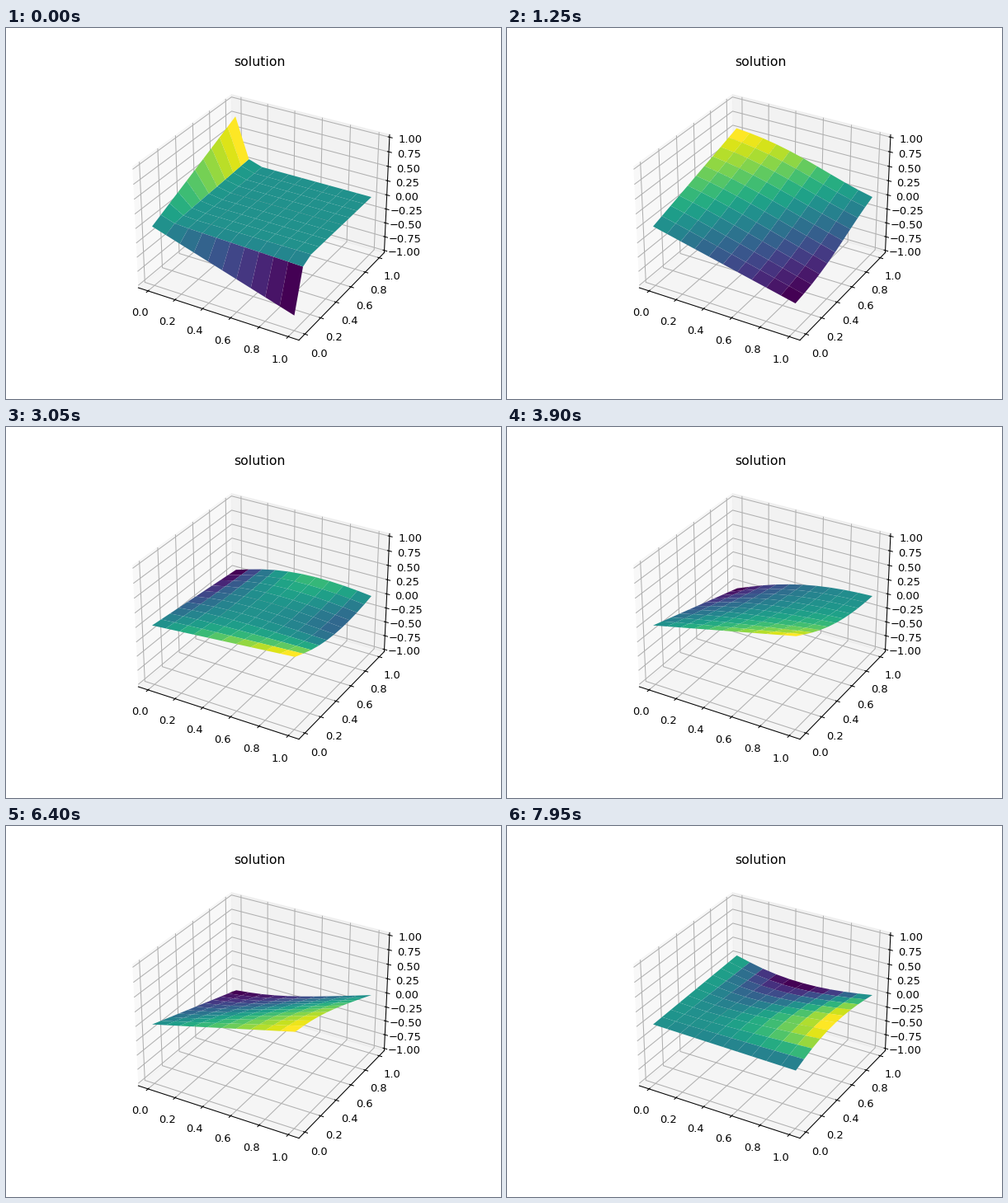
Write a matplotlib script that moves like this. It is 600x450 px and loops after 8 s.

```python
import numpy as np
import matplotlib.pyplot as plt
from matplotlib.animation import FuncAnimation
from mpl_toolkits.mplot3d.art3d import Poly3DCollection

FRAMES, INTERVAL = 160, 50
CELLS = 10          # grid cells per side
DT = 0.01           # time step of the solver
SUBSTEPS = 3        # solver steps per frame
AMP = 0.777         # height of the inflow wave

axis = np.linspace(0, 1, CELLS + 1)
X, Y = np.meshgrid(axis, axis, indexing="ij")


def set_inflow(u, t):
    """Oscillating ramps on the edges x = 0 and y = 0."""
    u[0, :] = AMP * axis * np.cos(t)
    u[:, 0] = -AMP * axis * np.cos(t)


def advance(u):
    """One upwind step of u_t + u_x + u_y = 0."""
    r = DT * CELLS
    inner = u[1:, 1:]
    u[1:, 1:] = inner - r * (2 * inner - u[:-1, 1:] - u[1:, :-1])


def solve():
    u = np.zeros_like(X)
    states = []
    for step in range(FRAMES * SUBSTEPS):
        set_inflow(u, step * DT)
        advance(u)
        if step % SUBSTEPS == 0:
            states.append(u.copy())
    return states


def quads(u):
    p = np.stack([X, Y, u], axis=-1)
    corners = [p[:-1, :-1], p[1:, :-1], p[1:, 1:], p[:-1, 1:]]
    return np.stack(corners, axis=2).reshape(-1, 4, 3)


def padded(lo, hi):
    pad = (hi - lo) / 48
    return lo - pad, hi + pad


states = solve()

fig = plt.figure(figsize=(6.4, 4.8), dpi=93.75)
ax = fig.add_subplot(projection="3d")
ax.set_title("solution")
ax.set_xlim(*padded(-0.05, 1.05))
ax.set_ylim(*padded(-0.05, 1.05))
ax.set_zlim(*padded(-1, 1))

surface = Poly3DCollection(quads(states[0]), cmap="viridis")
ax.add_collection3d(surface)


def update(frame):
    faces = quads(states[frame])
    height = faces[:, :, 2].mean(axis=1)
    surface.set_verts(faces)
    surface.set_array(height)
    surface.set_clim(height.min(), height.max())
    return (surface,)


anim = FuncAnimation(fig, update, frames=FRAMES, interval=INTERVAL,
                     init_func=lambda: update(0), repeat=True, repeat_delay=0)
plt.show()
```
